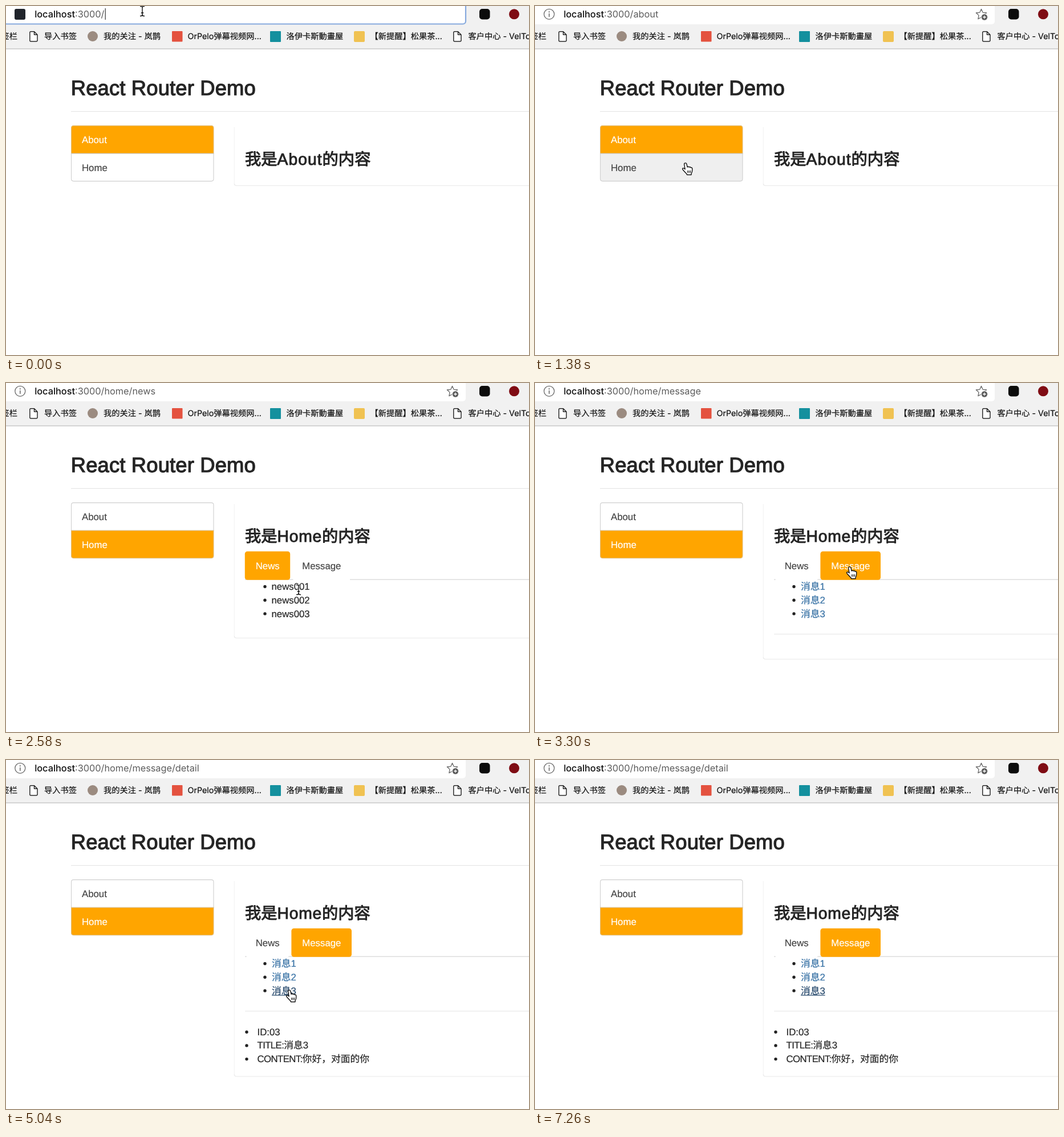
These frames come from a looping animation (917x611 px, 7.32 s). An HTML page:

```html
<!DOCTYPE html>
<html lang="zh-CN">
<head>
<meta charset="utf-8">
<title>React Router Demo</title>
<style>
html, body { margin: 0; width: 100%; height: 100%; overflow: hidden; background: #fff; }
svg { display: block; width: 917px; height: 611px; }
text {
  font: 16.8px "Liberation Sans", "Noto Sans CJK SC", sans-serif;
  fill: #252525; stroke: #252525; stroke-width: .2px;
  white-space: pre; text-rendering: geometricPrecision;
}
.url { font: 16.3px Inter, Roboto, sans-serif; fill: #5c5c5c; stroke: none; }
.url .host { fill: #111; font-weight: 500; }
.mark { font: 14.25px Inter, "Noto Sans CJK SC", sans-serif; fill: #111; stroke: #111; }
.mark.tc { font-family: Inter, "Noto Sans CJK TC", sans-serif; }
.title { font-size: 36.4px; letter-spacing: .15px; stroke-width: 1.2px; }
.head { font-size: 28.3px; stroke-width: 1px; }
.item { fill: #444; stroke: #444; }
.on { fill: #fff; stroke: #fff; }
.link { fill: #346fa3; stroke: #346fa3; }
.link.lit { fill: #23466a; stroke: #23466a; }
.caps { letter-spacing: -.6px; }
</style>
</head>
<body>
<svg viewBox="0 0 917 611">
  <g id="chrome"></g>
  <g id="page"></g>
  <g id="pointer"></g>
</svg>
<script>
const LOOP = 7320, STEP = 60;
const ORANGE = '#ffa500';

// [ms, state]: each entry changes part of the state
const steps = [
  [0, { path: '/', route: 'about', typing: true, focus: 0, detail: 0 }],
  [600, { path: '/about', typing: false }],
  [1740, { path: '/home/news', route: 'news' }],
  [3300, { path: '/home/message', route: 'message' }],
  [4080, { path: '/home/message/detail', detail: 1, focus: 1 }],
  [4500, { detail: 2, focus: 2 }],
  [4920, { detail: 3, focus: 3 }],
  [5700, { detail: 2, focus: 2 }],
  [6480, { detail: 3, focus: 3 }]
];

// [ms, x, y] of the pointer tip
const track = [
  [0, 239, 9], [300, 239, 9], [780, 252, 240], [1200, 264, 276],
  [2160, 264, 276], [2580, 513, 362], [2760, 522, 388], [3120, 552, 323],
  [3480, 552, 323], [3840, 499, 358], [4140, 499, 358], [4440, 497, 382],
  [4560, 497, 382], [4860, 497, 404], [5160, 497, 404], [5580, 494, 386],
  [6180, 494, 386], [6420, 497, 404], [6600, 497, 404], [6960, 520, 640],
  [LOOP, 520, 640]
];

const messages = ['你好，中国', '你好，宇宙', '你好，对面的你'];
const lineY = n => 338.4 + 23.7 * n;

const text = (x, y, s, cls = '') => `<text x="${x}" y="${y}" class="${cls}">${s}</text>`;
const rect = (x, y, w, h, fill, r = 0, more = '') =>
  `<rect x="${x}" y="${y}" width="${w}" height="${h}" rx="${r}" fill="${fill}" ${more}/>`;
const path = (d, stroke, w = 1, fill = 'none') =>
  `<path d="${d}" stroke="${stroke}" stroke-width="${w}" fill="${fill}"/>`;
const dot = (x, y, r, fill, more = '') => `<circle cx="${x}" cy="${y}" r="${r}" fill="${fill}" ${more}/>`;

function sheet(x) {
  return `<g transform="translate(${x} 44)" stroke-linejoin="round">` +
    path('M2.5 .8H8.5L14 6.3V16Q14 18 12 18H2.5Q.8 18 .8 16V2.5Q.8 .8 2.5 .8ZM8.5 .8V6.3H14', '#2b2b2b', 1.5, '#fff') + '</g>';
}

function star() {
  const pts = Array.from({ length: 10 }, (_, i) => {
    const a = (i / 5 - .5) * Math.PI, r = i % 2 ? 4.6 : 9.6;
    return (782.5 + r * Math.cos(a)).toFixed(1) + ' ' + (15 + r * Math.sin(a)).toFixed(1);
  });
  return `<g stroke-linejoin="round">${path('M' + pts.join('L') + 'Z', '#666', 1.3)}</g>` +
    dot(788, 19.5, 6.4, '#fff') + dot(788, 19.5, 5.2, '#5a5a5a') +
    path('M785.2 19.5H790.8M788 16.7V22.3', '#fff', 1.3);
}

function drawChrome(s) {
  const ring = s.typing ? 'stroke="#86a9dd" stroke-width="2.2"' : '';
  return rect(0, 0, 917, 75, '#f1f1f1') + rect(0, 74.5, 917, 1.1, '#b8b8b8') +
    rect(-4, -10, 810, s.typing ? 41.5 : 42, '#fff', 5, ring) +
    (s.typing
      ? rect(15, 5, 19, 19, '#20242b', 3) + rect(173.6, 4, 1.2, 20, '#333')
      : dot(24.8, 14.3, 9, 'none', 'stroke="#6a6a6a" stroke-width="1.3"') +
        dot(24.8, 10.3, 1.1, '#666') + path('M24.8 13V19', '#666', 1.5) + star()) +
    text(50.2, 20, `<tspan class="host">localhost</tspan>:3000${s.path}`, 'url') +
    rect(830, 5, 18.5, 18.5, '#0c0c0c', 5) + dot(891, 14.3, 9, '#7f0c14') +
    text(-8.5, 58, '签栏', 'mark') +
    sheet(41) + text(67, 58, '导入书签', 'mark') +
    dot(152, 53, 9, '#9b8b80') + text(171, 58, '我的关注 - 岚鹊', 'mark') +
    rect(291, 44, 18.5, 18.5, '#e4523f', 1) + text(318.5, 58, 'OrPelo弹幕视频网...', 'mark') +
    rect(463, 44, 19, 19, '#14909e', 1) + text(491.5, 58, '洛伊卡斯動畫屋', 'mark tc') +
    rect(610, 44, 19, 19, '#f0c252', 2) + text(638.5, 58, '【新提醒】松果茶...', 'mark') +
    sheet(784) + text(810.5, 58, '客户中心 - VelTor', 'mark');
}

const inside = (p, x, y, w, h) => p.x >= x && p.x < x + w && p.y >= y && p.y < y + h;
const linkAt = p => [1, 2, 3].find(n => inside(p, 466, lineY(n) - 16, 43, 22)) || 0;

function drawMenu(s, p) {
  const left = 114.5, right = 364, r = 4;
  const tops = `M${left} 258.4V${209.6 + r}q0 -${r} ${r} -${r}H${right - r}q${r} 0 ${r} ${r}V258.4Z`;
  const ends = `M${left} 258.4V${306.6 - r}q0 ${r} ${r} ${r}H${right - r}q${r} 0 ${r} -${r}V258.4Z`;
  const row = (d, y, name, on) => {
    const fill = on ? ORANGE : inside(p, 115, y, 249, 48) ? '#efefef' : '#fff';
    return path(d, on ? '#e2bd78' : '#cfcfcf', 1.1, fill) + text(133, y + 30, name, on ? 'on' : 'item');
  };
  const about = s.route === 'about';
  return row(tops, 210, 'About', about) + row(ends, 258.5, 'Home', !about);
}

function drawTab(x, w, name, on, p) {
  const hover = !on && inside(p, x, 295, w, 49);
  return (on || hover ? rect(x, 294.7, w, 50, on ? ORANGE : '#eee', 4.5) : rect(x + 3, 343, w - 6, 2.4, '#fff')) +
    text(x + 18.9, 326, name, on ? 'on' : 'item');
}

function drawList(s, p) {
  const over = linkAt(p);
  return [1, 2, 3].map(n => {
    const y = lineY(n), bullet = dot(454, y - 5.6, 2.7, '#222');
    if (s.route === 'news') return bullet + text(465.5, y, 'news00' + n);
    const lit = n === over || n === s.focus;
    return bullet + text(466, y, '消息' + n, lit ? 'link lit' : 'link') +
      (lit ? rect(466, y + 1.8, 42.6, 1.2, '#23466a') : '');
  }).join('');
}

function drawDetail(n) {
  const lines = [['ID:', '0' + n], ['TITLE:', '消息' + n], ['CONTENT:', messages[n - 1]]];
  return lines.map(([key, value], i) => {
    const y = 481.6 + 23.7 * i;
    return dot(422, y - 5.4, 2.7, '#222') +
      text(440.5, y, `<tspan class="${i ? 'caps' : ''}">${key}</tspan>${value}`);
  }).join('');
}

function drawPage(s, p) {
  const home = s.route !== 'about', msg = s.route === 'message';
  const bottom = !home ? 314.5 : !msg ? 446.5 : s.detail ? 554 : 483.5;
  let out = text(113.8, 156, 'React Router Demo', 'title') + rect(114, 184, 803, 1.2, '#e6e6e6') + drawMenu(s, p) +
    path(`M400.2 212V${bottom - 4}`, '#f1f1f1') +
    path(`M400.2 ${bottom - 4}q0 4 4.5 4H917`, '#e9e9e9', 1.2) +
    text(419, 277.5, `我是<tspan letter-spacing="${home ? .7 : 1}">${home ? 'Home' : 'About'}</tspan>的内容`, 'head');
  if (!home) return out;
  out += rect(419, 343.5, 498, 1.2, '#d6d6d6') +
    drawTab(418.8, 79.4, 'News', !msg, p) + drawTab(500.4, 105.6, 'Message', msg, p) + drawList(s, p);
  if (msg) out += rect(419, 439, 498, 1.2, '#e9e9e9');
  if (s.detail) out += drawDetail(s.detail);
  return out;
}

const shapes = {
  hand: path('M-2.4 1C-2.4 -1.6 1.4 -1.8 1.9 .6L3.1 6Q4.5 4.7 6 6Q8 5.2 9 6.8Q11.5 6.4 11.8 9L11.6 13Q11.4 15 10.2 17L10 19.5H2.5L2 18' +
    'Q-1.5 14.5 -4.5 11Q-6.3 8.6 -4.6 8Q-3 7.4 -.9 9.8Z', '#111', 1.4, '#fff') +
    path('M3.7 12V16.3M6.1 12V16.3M8.5 12V16.3', '#111', 1.1),
  arrow: path('M0 0V16.5L3.9 12.9L6.4 18.8L9 17.7L6.5 11.9H11.8Z', '#fff', 1.3, '#000')
};
const beam = 'M-4 -8.5H-2.5Q0 -8.5 0 -6V6Q0 8.5 -2.5 8.5H-4M4 -8.5H2.5Q0 -8.5 0 -6M0 6Q0 8.5 2.5 8.5H4M-2.2 3H2.2';
shapes.beam = path(beam, '#fff', 3) + path(beam, '#111', 1.4);

function pointerKind(s, p) {
  const home = s.route !== 'about';
  if (inside(p, 115, 210, 249, 97)) return 'hand';
  if (home && inside(p, 419, 295, 187, 49)) return 'hand';
  if (s.route === 'message' && linkAt(p)) return 'hand';
  if (inside(p, 0, 0, 770, 31) || inside(p, 114, 125, 323, 40) || inside(p, 419, 250, 219, 36)) return 'beam';
  if (s.route === 'news' && inside(p, 466, 346, 66, 70)) return 'beam';
  if (s.detail && inside(p, 441, 465, 196, 70)) return 'beam';
  return 'arrow';
}

function pointerAt(t) {
  const i = track.findIndex(k => k[0] > t);
  const [t0, x0, y0] = track[i - 1], [t1, x1, y1] = track[i];
  const u = (t - t0) / (t1 - t0), e = u * u * (3 - 2 * u);
  return { x: x0 + (x1 - x0) * e, y: y0 + (y1 - y0) * e };
}

const layer = id => document.getElementById(id);
const cache = {};
function put(id, html) {
  if (cache[id] === html) return;
  cache[id] = html;
  layer(id).innerHTML = html;
}

function draw(t) {
  const s = Object.assign({}, ...steps.filter(k => k[0] <= t).map(k => k[1]));
  const p = pointerAt(t);
  put('chrome', drawChrome(s));
  put('page', drawPage(s, p));
  put('pointer', `<g transform="translate(${p.x.toFixed(1)} ${p.y.toFixed(1)})" stroke-linejoin="round">${shapes[pointerKind(s, p)]}</g>`);
}

const start = performance.now();
function tick() {
  const t = (performance.now() - start) % LOOP;
  draw(Math.floor(t / STEP) * STEP);
  requestAnimationFrame(tick);
}
tick();
</script>
</body>
</html>
```
